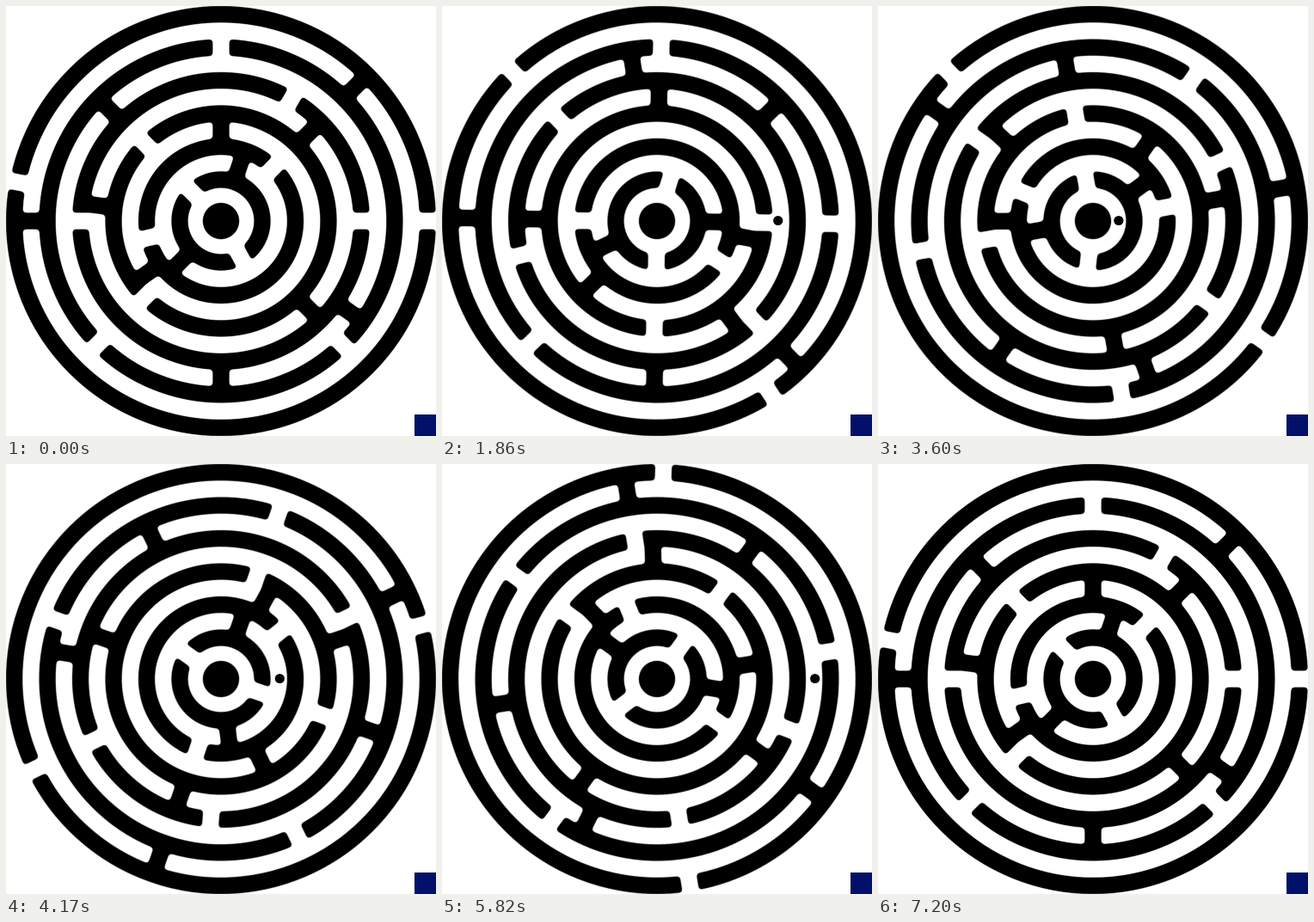
Recreate the animation shown at these times as an HTML page with a canvas. Size 500 by 500 pixels, loop 7.23 s.

```html
<!DOCTYPE html>
<html lang="en">
<head>
<meta charset="utf-8">
<title>Round maze</title>
<style>
  html, body { margin: 0; width: 100%; height: 100%; overflow: hidden; background: #fff; }
  canvas { display: block; width: 500px; height: 500px; }
</style>
</head>
<body>
<canvas id="stage" width="500" height="500"></canvas>
<script>
const TAU = Math.PI * 2;
const RAD = Math.PI / 180;
const UNIT = 250 / 13;      // thickness of a wall and of a corridor
const PAD = 10;
const SCALE = 2;
const SIZE = (500 + PAD * 2) * SCALE;

// From the centre outwards, angles clockwise from the right:
// openings in each ring, and walls across the corridor inside it.
const RINGS = [
  { gaps: [61.5, 225], walls: [] },
  { gaps: [167, 314.3], walls: [135, 288.5] },
  { gaps: [135, 225.5], walls: [144.7, 270] },
  { gaps: [0, 180, 300], walls: [45, 187.2, 315] },
  { gaps: [45.5, 135, 270], walls: [35.3, 90, 225] },
  { gaps: [0, 190.8], walls: [180, 315] }
];
const ringInner = i => (2 + 2 * i) * UNIT;
const lane = i => (1.5 + 2 * i) * UNIT;
const OUTSIDE = 256.5;

// Each row: step, angle of the ball inside the maze, distance from the centre.
const PATH = [
  [0, 0, OUTSIDE], [6, 0, lane(5)],
  [23.2, 135, lane(5)], [29.2, 135, lane(4)],
  [41.7, 180, lane(4)], [47.7, 180, lane(3)],
  [60.3, 134.1, lane(3)], [66.3, 134.1, lane(2)],
  [83.6, -45.7, lane(2)], [89.6, -45.7, lane(1)],
  [104, 61.5, lane(1)], [110, 61.5, lane(0)],
  [128.3, -135, lane(0)], [134.3, -135, lane(1)],
  [145.5, -193, lane(1)], [151.5, -193, lane(2)],
  [162.4, -134.5, lane(2)], [168.4, -134.5, lane(3)],
  [180.5, -60, lane(3)], [186.5, -60, lane(4)],
  [195.8, -90, lane(4)], [201.8, -90, lane(5)],
  [214, -169.2, lane(5)], [220, -169.2, OUTSIDE],
  [221.5, -169.2, OUTSIDE], [239, 0, OUTSIDE]
];
const STEP = 30;
const LOOP = 7230;

function newCanvas() {
  const c = document.createElement('canvas');
  c.width = c.height = SIZE;
  return c;
}

function disc(g, x, y, r) {
  g.beginPath();
  g.arc(x, y, r, 0, TAU);
  g.fill();
}

// A block lying across a ring or corridor that starts at radius r.
function block(g, angle, r, color) {
  g.save();
  g.rotate(angle * RAD);
  g.fillStyle = color;
  g.fillRect(r - 2, -UNIT / 2, UNIT + 4, UNIT);
  g.restore();
}

function buildMaze() {
  const raw = newCanvas();
  const g = raw.getContext('2d');
  g.fillStyle = '#fff';
  g.fillRect(0, 0, SIZE, SIZE);
  g.translate(SIZE / 2, SIZE / 2);
  g.scale(SCALE, SCALE);
  g.lineWidth = UNIT;
  RINGS.forEach((ring, i) => {
    g.beginPath();
    g.arc(0, 0, ringInner(i) + UNIT / 2, 0, TAU);
    g.stroke();
  });
  RINGS.forEach((ring, i) => ring.walls.forEach(a => block(g, a, ringInner(i) - UNIT, '#000')));
  RINGS.forEach((ring, i) => ring.gaps.forEach(a => block(g, a, ringInner(i), '#fff')));
  g.fillStyle = '#000';
  disc(g, 0, 0, 21.3);

  // Blur and sharpen again to round every corner.
  const out = newCanvas();
  const h = out.getContext('2d');
  h.fillStyle = '#fff';
  h.fillRect(0, 0, SIZE, SIZE);
  h.filter = 'blur(4.4px)';
  h.drawImage(raw, 0, 0);
  h.filter = 'none';
  const img = h.getImageData(0, 0, SIZE, SIZE);
  const d = img.data;
  for (let i = 0; i < d.length; i += 4) {
    d[i] = d[i + 1] = d[i + 2] = (d[i] - 128) * 6 + 128;
    d[i + 3] = 255;
  }
  h.putImageData(img, 0, 0);
  return out;
}

function poseAt(step) {
  let i = 1;
  while (i < PATH.length - 1 && PATH[i][0] < step) i++;
  const [s0, a0, r0] = PATH[i - 1];
  const [s1, a1, r1] = PATH[i];
  const p = Math.min(1, (step - s0) / (s1 - s0));
  return { angle: a0 + (a1 - a0) * p, radius: r0 + (r1 - r0) * p };
}

const ctx = document.getElementById('stage').getContext('2d');
ctx.imageSmoothingQuality = 'high';
const maze = buildMaze();
const start = performance.now();

function draw() {
  const t = Math.max(0, performance.now() - start) % LOOP;
  const { angle, radius } = poseAt(Math.max(0, Math.floor(t / STEP) - 1));
  const half = 250 + PAD;

  ctx.fillStyle = '#fff';
  ctx.fillRect(0, 0, 500, 500);
  ctx.save();
  ctx.translate(250, 250);
  ctx.rotate(-angle * RAD);
  ctx.drawImage(maze, -half, -half, half * 2, half * 2);
  ctx.restore();

  ctx.fillStyle = '#000';
  disc(ctx, 251 + radius, 249.5, 5.6);
  ctx.fillStyle = '#03106a';
  ctx.fillRect(475, 475, 25, 25);
  requestAnimationFrame(draw);
}
draw();
</script>
</body>
</html>
```
